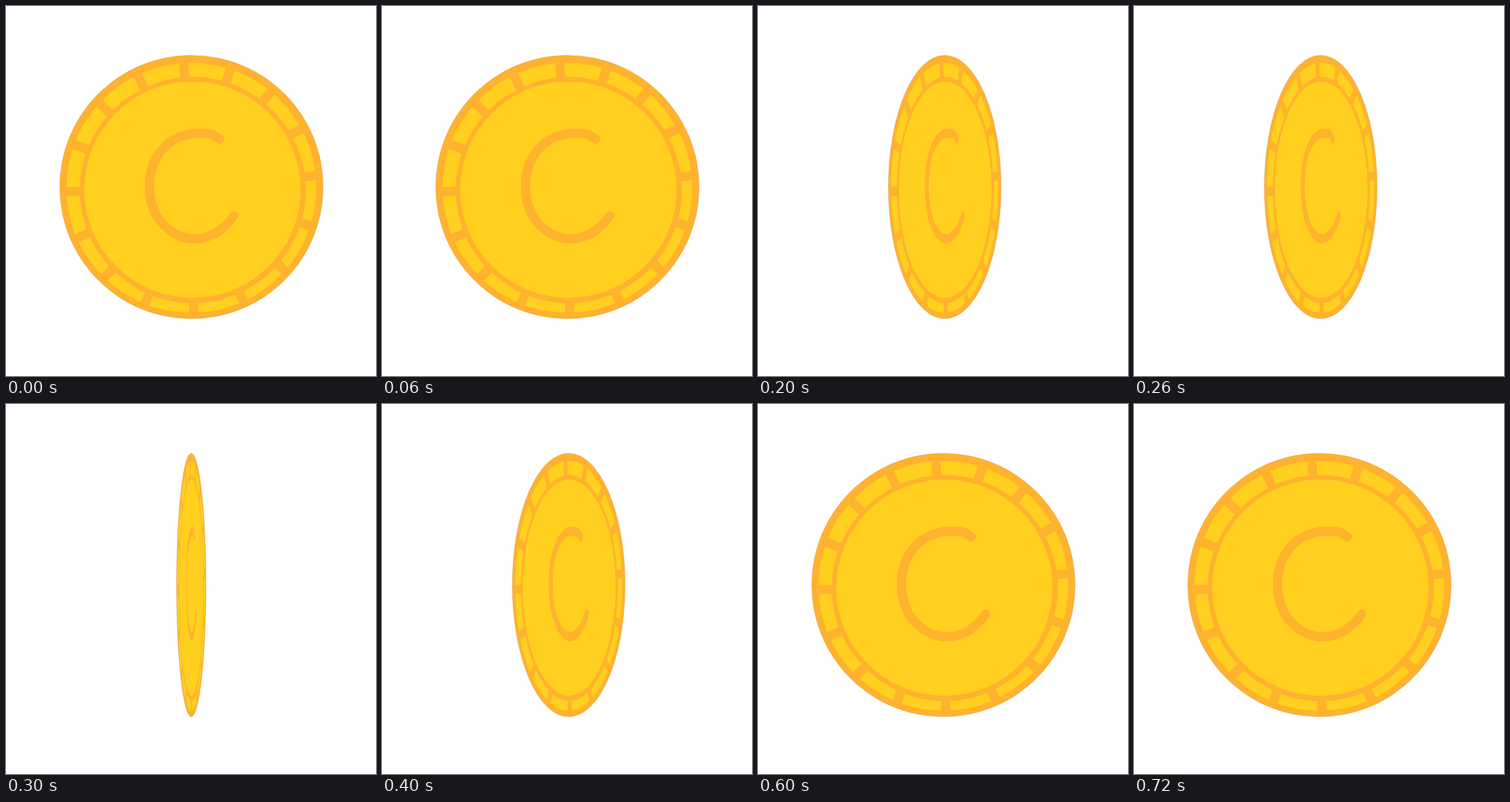
Recreate the animation shown at these times as an HTML page. Size 520 by 520 pixels, loop 0.8 s.

```html
<!DOCTYPE html>
<html lang="en">
<head>
<meta charset="utf-8">
<title>Spinning coin</title>
<style>
  html, body { margin: 0; width: 100%; height: 100%; overflow: hidden; background: #fff; }
  svg { display: block; width: 100%; height: 100%; }
  .gold { fill: #ffd01f; }
  .amber { fill: #ffb22e; }
  .line { fill: none; stroke: #ffb22e; stroke-width: 13; }
  .rim { stroke: #988; stroke-opacity: .4; stroke-width: .6; vector-effect: non-scaling-stroke; }
</style>
</head>
<body>
<svg viewBox="0 0 520 520">
  <g id="coin">
    <circle class="amber rim" cx="260.6" cy="254.4" r="185.2"/>
    <circle class="gold" cx="260.5" cy="255.5" r="175.5"/>
    <path id="spokes" class="line"/>
    <circle class="amber" cx="262.5" cy="258.6" r="159"/>
    <circle class="gold" cx="262" cy="258" r="152"/>
    <path class="line" stroke-linecap="round" stroke-linejoin="round"
      d="M300 187Q291 179 282 179Q250 176 227 194C209 210 201 232 201.5 256C202 275 209 295 221 307C234 320 250 328 267 327C290 327 310 310 320 295"/>
  </g>
</svg>
<script>
const STEP = 100, LOOP = 800, SPOKES = 16;
const CX = 260.6, CY = 256, RADIUS = 185.2;
const coin = document.getElementById('coin');
const rad = degrees => degrees * Math.PI / 180;

// Evenly spaced spokes with a slight hand-drawn drift around the rim.
function spoke(i) {
  const even = rad(i * 360 / SPOKES);
  const angle = even - rad(3 + 2.4 * Math.cos(even + rad(30)) + .7 * Math.cos(2 * even));
  const point = r => `${CX + r * Math.cos(angle)} ${CY + r * Math.sin(angle)}`;
  return `M${point(150)}L${point(179)}`;
}
document.getElementById('spokes')
  .setAttribute('d', Array.from({ length: SPOKES }, (_, i) => spoke(i)).join(''));

// Left and right edges, from face-on to nearly edge-on.
const poses = [[75.4, 445.8], [106.4, 414.8], [183.1, 341.7], [239.6, 281.1]];

function draw(ms) {
  const step = Math.min(6, Math.floor(ms % LOOP / STEP));
  const [left, right] = poses[3 - Math.abs(3 - step)];
  const scale = (right - left) / (2 * RADIUS);
  coin.setAttribute('transform',
    `translate(${(left + right) / 2} 0) scale(${scale} 1) translate(${-CX} 0)`);
}

const start = performance.now();
function tick() {
  draw(performance.now() - start);
  requestAnimationFrame(tick);
}
tick();
</script>
</body>
</html>
```
